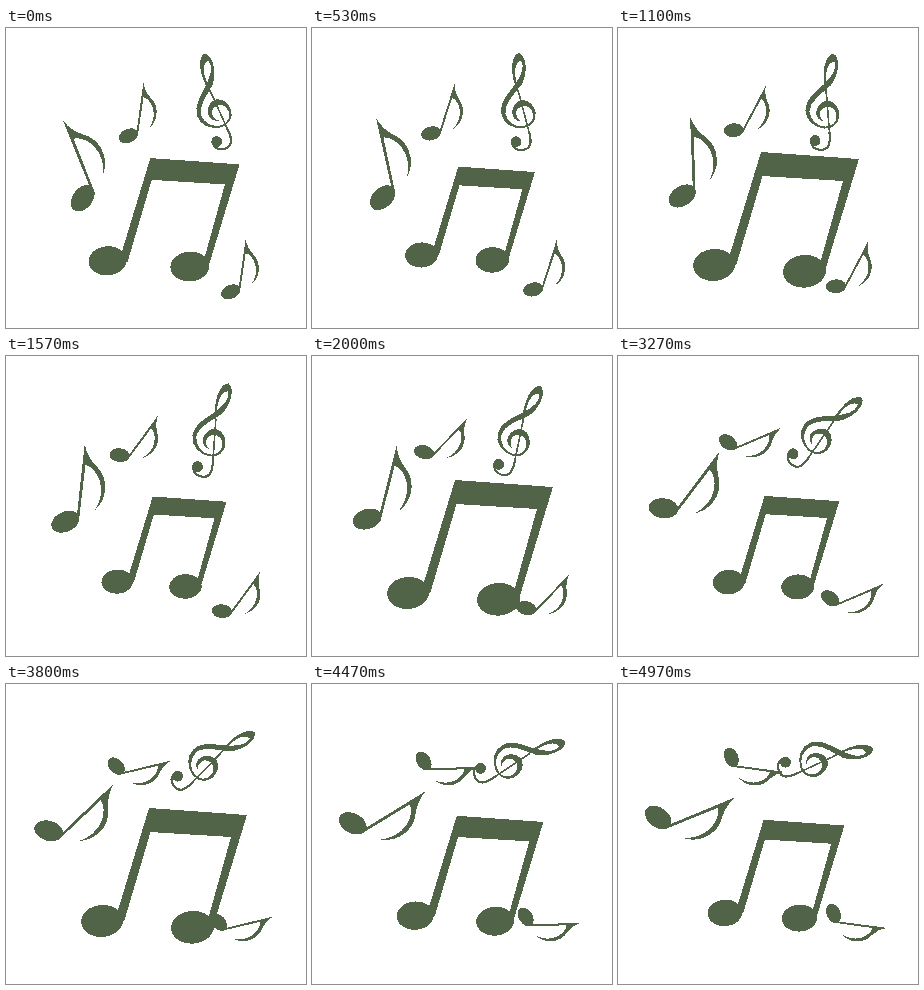
These frames come from a looping animation (300 px wide and 300 px high, 5010 ms). An HTML page:

```html
<!DOCTYPE html>
<html lang="en">
<head>
<meta charset="utf-8">
<title>Dancing notes</title>
<style>
html, body { margin: 0; height: 100%; overflow: hidden; background: #fff; }
svg { display: block; width: 100vw; height: 100vh; }
</style>
</head>
<body>
<svg viewBox="0 0 300 300" fill="#526448" shape-rendering="crispEdges">
  <defs>
    <g id="note" transform="translate(-77 -133.5)">
      <ellipse cx="64.3" cy="168" rx="14.7" ry="10" transform="rotate(-33 64.3 168)"/>
      <path d="M72 88.5C75 97 80 103 85 107C94 113 99 121 99 133C99 140 96 147 92 152
        C96 143 97 131 92 122C88 114 81 109 75.8 109L77.6 166H75Z"/>
    </g>
  </defs>

  <g id="pair">
    <path d="M143 124L241 131L207 243L203 232L225 153L144.5 148L118 238L112 226Z"/>
    <ellipse cx="96" cy="237" rx="21" ry="16" transform="rotate(-4 96 237)"/>
    <ellipse cx="186.5" cy="243.3" rx="21.5" ry="16.3" transform="rotate(-4 186.5 243.3)"/>
  </g>

  <use class="spin" href="#note" data-x="77" data-y="133.5" data-scale="1" data-angle="-19.8"/>
  <use class="spin" href="#note" data-x="135.3" data-y="86" data-scale=".69" data-angle="10.2"/>
  <use class="spin" href="#note" data-x="237.5" data-y="242" data-scale=".69" data-angle="10.2"/>

  <g class="spin" data-x="207" data-y="74.1" data-scale="1" data-angle="-19.8">
    <g transform="translate(-207.5 -73.5)">
      <path d="M208 65C203 42 208 26 216 25C223 29 222 46 213 57C204 65 192 73 192 83
        C193 92 200 98 208 98C215 98 219 93 219 88C219 81 214 78 210 78C204 79 201 83 203 88
        C203 91 206 92 207 93C201 92 198 88 199 82C201 75 206 72 211 72C218 73 222 80 222 87
        C221 95 216 100 207 100C197 99 188 92 188 82C188 70 199 63 207 55
        C214 48 220 40 217 33C211 33 206 42 209.5 65Z"/>
      <g fill="none" stroke="#526448">
        <path d="M208.7 62L212 104" stroke-width="1.6"/>
        <path d="M212 103.5C213.5 117 210 121.3 203.5 121.3C198 121 194 118 193.5 113" stroke-width="2.2"/>
      </g>
      <circle cx="197.6" cy="112" r="5.4"/>
    </g>
  </g>
</svg>
<script>
const LOOP = 5010, BEAT = 900, PEAK = 186;
const pair = document.getElementById('pair');
const spinners = document.querySelectorAll('.spin');

function draw() {
  const t = performance.now() % LOOP;
  for (const el of spinners) {
    const { x, y, scale, angle } = el.dataset;
    el.setAttribute('transform',
      `translate(${x} ${y}) rotate(${+angle + t * 0.018}) scale(${scale})`);
  }
  const s = 0.875 + 0.125 * Math.cos(2 * Math.PI * (t - PEAK) / BEAT);
  pair.setAttribute('transform', `translate(158 191) scale(${s}) translate(-158 -191)`);
  requestAnimationFrame(draw);
}
draw();
</script>
</body>
</html>
```
